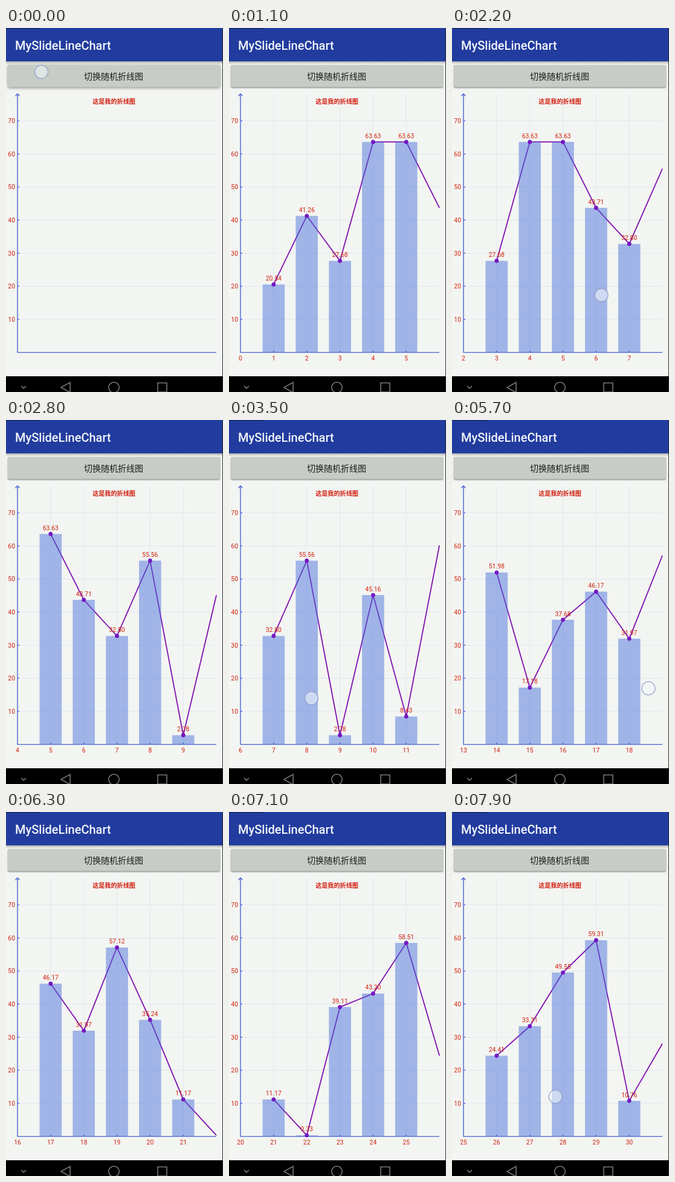
These frames come from a looping animation (359 by 601 pixels, 8000 ms). An HTML page:

```html
<!DOCTYPE html>
<html lang="zh">
<head>
<meta charset="utf-8">
<title>Sliding line chart</title>
<style>
  html, body { margin: 0; width: 100%; height: 100%; overflow: hidden; background: #f3f5f2; }
  svg { display: block; width: 359px; height: 601px; }
  text { font-family: Roboto, "Noto Sans CJK SC", "Noto Sans CJK", sans-serif; }
  .num { font-size: 10.4px; fill: #d0200e; }
  .mid { text-anchor: middle; }
  .end { text-anchor: end; }
  .grid { stroke: #e0e7f3; stroke-width: 1; }
  .axis { stroke: #4864d4; stroke-width: 1.4; fill: none; }
  .line { stroke: #7f10ae; stroke-width: 1.8; fill: none; stroke-linejoin: round; }
  .bar { fill: rgba(70, 110, 218, .48); }
  .dot { fill: #7417c2; }
  .nav { stroke: #777; stroke-width: 1.6; fill: none; }
</style>
</head>
<body>
<svg viewBox="0 0 359 601">
  <defs>
    <linearGradient id="fade" x2="0" y2="1">
      <stop stop-color="#000" stop-opacity=".3"/>
      <stop offset="1" stop-color="#000" stop-opacity="0"/>
    </linearGradient>
    <filter id="soft" x="-5%" y="-30%" width="110%" height="160%">
      <feGaussianBlur id="blur" stdDeviation="1"/>
    </filter>
  </defs>
  <rect width="359" height="601" fill="#f3f5f2"/>
  <rect y="55" width="359" height="5" fill="url(#fade)"/>
  <rect width="359" height="55" fill="#213c9e"/>
  <rect width="58" height="1" fill="#10183c"/>
  <text x="15" y="35.5" font-size="20" font-weight="500" fill="#f4f6fb">MySlideLineChart</text>

  <rect x="3" y="62" width="351" height="37" rx="2" fill="#000" opacity=".42" filter="url(#soft)"/>
  <rect x="3" y="61" width="351" height="36.5" rx="2" fill="#c7ccc6"/>
  <text class="mid" x="178" y="85" font-size="14" font-weight="500" fill="#1b1d1b">切换随机折线图</text>

  <g id="rows"></g>
  <g id="data"></g>
  <path class="axis" d="M19 109V535.6H348"/>
  <path class="axis" d="M15.5 112.5L19 108.5L22.5 112.5" stroke-width="1.6"/>
  <g id="labels"></g>
  <text class="mid" x="178.5" y="125" font-size="10.1" font-weight="700" fill="#d0200e">这是我的折线图</text>

  <circle id="finger" r="11" fill="#f4f7fb" fill-opacity=".55" stroke="#8f9cc8" stroke-opacity=".75" stroke-width="1.6"/>

  <rect y="575" width="359" height="26"/>
  <path class="nav" d="M25 591L29 595L33 591M106 585V602L91 593.5ZM251 586H266V601H251Z"/>
  <circle class="nav" cx="178.5" cy="593.5" r="8.7"/>
  <rect x="358" width="1" height="601" fill="#25282c"/>
</svg>
<script>
const LOOP = 8000, TICK = 100, SHOWN_AT = 300;
const LEFT = 19, RIGHT = 348, TOP = 109, BASE = 535.6, GAP = 54.85, UNIT = 5.46;
const DRAG = 54;   // pixels of drag per point

const values = [
  0, 20.54, 41.26, 27.68, 63.63, 63.63, 43.71, 32.80, 55.56, 2.78, 45.16,
  8.43, 60.22, 60.32, 51.98, 17.18, 37.68, 46.17, 31.97, 57.12, 35.24,
  11.17, 0.33, 39.11, 43.20, 58.51, 24.41, 33.31, 49.55, 59.31, 10.76, 28.04
];

// start, end, x from, x to, y from, y to
const swipes = [
  [1200, 1700, 300, 180, 446, 452],
  [2050, 2600, 288, 138, 440, 444],
  [3000, 3550, 290, 121, 452, 460],
  [3800, 4250, 290, 170, 455, 462],
  [4450, 5050, 310, 84, 464, 471],
  [5650, 6150, 345, 145, 442, 452],
  [6400, 6900, 320, 100, 450, 460],
  [7200, 7480, 300, 180, 458, 464],
  [7600, 7950, 340, 143, 464, 471]
];

const $ = id => document.getElementById(id);
const xAt = k => LEFT + k * GAP;
const yAt = v => BASE - v * UNIT;

function add(parent, tag, attrs, text) {
  const el = document.createElementNS('http://www.w3.org/2000/svg', tag);
  for (const key in attrs) el.setAttribute(key, attrs[key]);
  if (text !== undefined) el.textContent = text;
  parent.append(el);
}

for (let v = 10; v <= 70; v += 10) {
  const y = yAt(v);
  add($('rows'), 'path', { class: 'grid', d: `M${LEFT} ${y}H${RIGHT}` });
  add($('rows'), 'path', { class: 'axis', d: `M${LEFT} ${y}h3` });
  add($('rows'), 'text', { class: 'num end', x: 15, y: y + 3.7 }, v);
}

function drawChart(first) {
  const data = $('data'), labels = $('labels');
  data.replaceChildren();
  labels.replaceChildren();
  if (first < 0) return;

  const points = [1, 2, 3, 4, 5, 6].map(k => [xAt(k), yAt(values[first + k])]);
  const marked = points.slice(0, 5);
  for (const [x] of marked) add(data, 'path', { class: 'grid', d: `M${x} ${TOP}V${BASE}` });
  add(data, 'polyline', { class: 'line', points: points.join(' ') });
  for (const [x, y] of marked) {
    add(data, 'rect', { class: 'bar', x: x - 18.3, y, width: 36.6, height: BASE - y });
    add(data, 'path', { class: 'axis', d: `M${x} ${BASE}v-3` });
  }
  marked.forEach(([x, y], i) => {
    add(labels, 'circle', { class: 'dot', cx: x, cy: y, r: 3.4 });
    add(labels, 'text', { class: 'num mid', x, y: y - 6.3 }, values[first + i + 1].toFixed(2));
  });
  for (let k = 0; k < 6; k++) {
    add(labels, 'text', { class: 'num mid', x: xAt(k), y: 549.3 }, first + k);
  }
}

function stateAt(t) {
  let first = t < SHOWN_AT ? -1 : 0;
  let touch = t < 200 ? [58.5, 72.5] : null;
  for (const [start, end, x0, x1, y0, y1] of swipes) {
    if (t < start) break;
    const p = Math.min(1, (t - start) / (end - start));
    const x = x0 + (x1 - x0) * p;
    first += Math.floor((x0 - x) / DRAG);
    if (p < 1) touch = [x, y0 + (y1 - y0) * p];
  }
  return { first, touch };
}

let shown;
function frame(now) {
  const t = Math.floor(now % LOOP / TICK) * TICK;
  const { first, touch } = stateAt(t);
  if (first !== shown) drawChart(shown = first);
  $('blur').setAttribute('stdDeviation', t < SHOWN_AT ? 2.6 : 1);
  $('finger').setAttribute('visibility', touch ? 'visible' : 'hidden');
  if (touch) $('finger').setAttribute('transform', `translate(${touch})`);
}

const begin = performance.now();
function loop() {
  frame(performance.now() - begin);
  requestAnimationFrame(loop);
}
loop();
</script>
</body>
</html>
```
